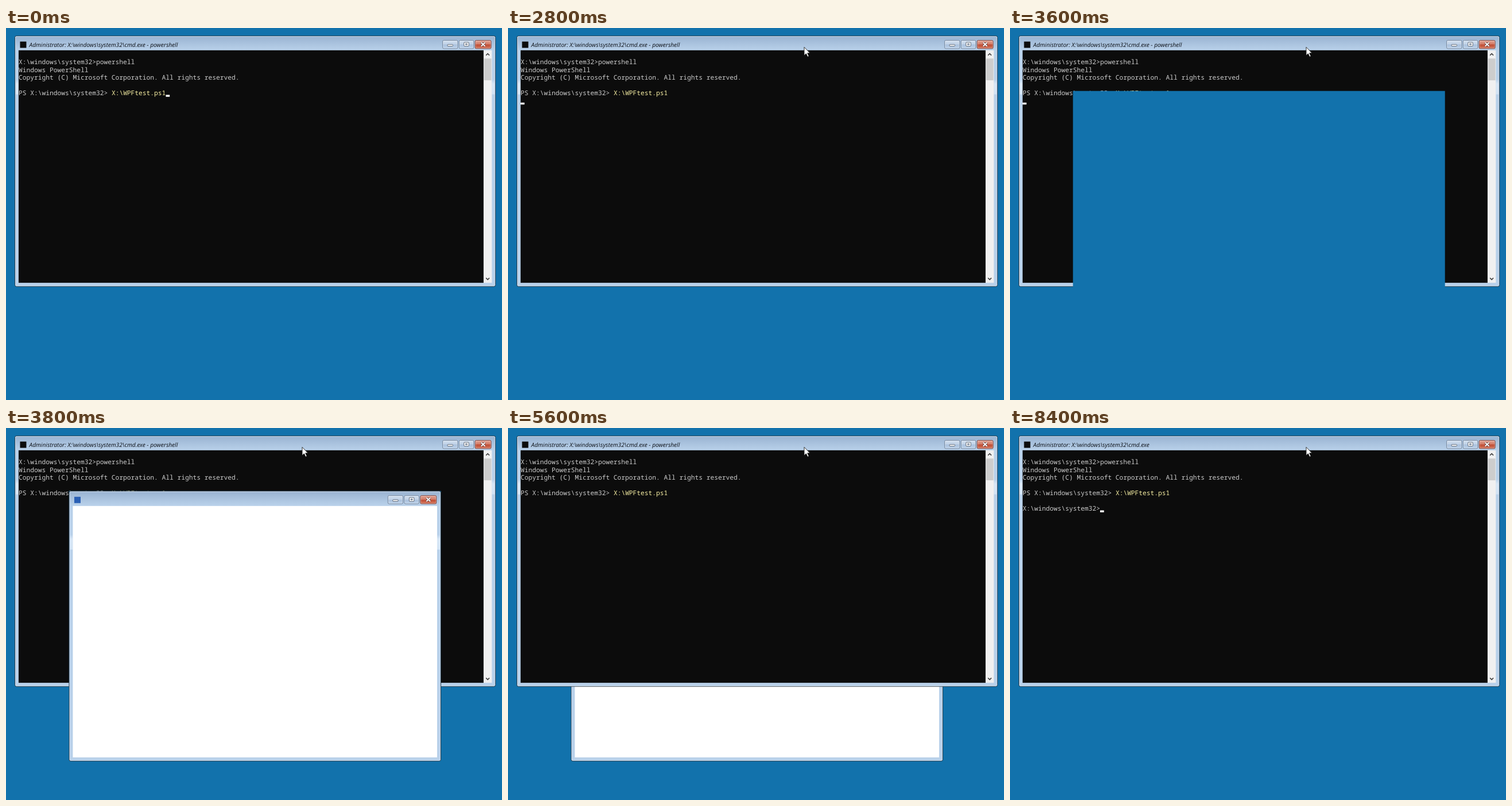
An HTML page that plays this animation: 864x648 px, repeating every 8600 ms.

```html
<!DOCTYPE html>
<html lang="en">
<head>
<meta charset="utf-8">
<title>Console session</title>
<style>
  html, body { margin: 0; width: 100%; height: 100%; overflow: hidden; background: #1272ac; }
  svg { display: block; width: 864px; height: 648px; }
  text { white-space: pre; text-rendering: geometricPrecision; }
  .mono { font: 13.333px "Noto Sans Mono", "DejaVu Sans Mono", monospace; fill: #ccc; }
  .mono .cmd { fill: #f9f1a5; }
  .title { font: italic 12.05px "Open Sans", "Noto Sans", sans-serif; fill: #0a0e14; }
</style>
</head>
<body>
<!-- The desktop is 1024 x 768, shown at 864 x 648. -->
<svg id="stage" viewBox="0 0 1024 768" xmlns="http://www.w3.org/2000/svg">
  <defs>
    <linearGradient id="bar" x2="0" y2="1">
      <stop offset="0" stop-color="#9ab4d2"/><stop offset="1" stop-color="#b9d1ea"/>
    </linearGradient>
    <linearGradient id="glow" x2="0" y2="1">
      <stop offset="0" stop-color="#d8e7f6" stop-opacity="0"/>
      <stop offset=".3" stop-color="#d8e7f6"/><stop offset="1" stop-color="#d3e4f5"/>
    </linearGradient>
    <linearGradient id="btn" x2="0" y2="1">
      <stop offset="0" stop-color="#d3e0ef"/><stop offset=".48" stop-color="#c0d2e7"/>
      <stop offset=".5" stop-color="#a9c0dc"/><stop offset="1" stop-color="#bdd2ea"/>
    </linearGradient>
    <linearGradient id="red" x2="0" y2="1">
      <stop offset="0" stop-color="#e3a596"/><stop offset=".48" stop-color="#d27a66"/>
      <stop offset=".5" stop-color="#bd4a32"/><stop offset="1" stop-color="#d5765c"/>
    </linearGradient>
  </defs>
  <rect width="1024" height="768" fill="#1272ac"/>
  <g id="windows"></g>
  <path id="mouse" d="M611.5 39.5v17l4-3.6l3 6.6l2.7-1.2l-3-6.4h5.3z"
        fill="#fff" stroke="#111"/>
</svg>
<script>
const LOOP = 8600, TICK = 200;
const CELL_W = 8, CELL_H = 16, LEFT = 26, TOP = 46;
const $ = id => document.getElementById(id);

const rect = (x, y, w, h, fill, more = '') =>
  `<rect x="${x}" y="${y}" width="${w}" height="${h}" fill="${fill}" ${more}/>`;
const path = (d, stroke, width) =>
  `<path d="${d}" fill="none" stroke="${stroke}" stroke-width="${width}"/>`;

function button(x, y, w, fill, edge) {
  return rect(x + .5, y + .5, w - 1, 17, fill, `rx="2.5" stroke="${edge}"`) +
    rect(x + 1.5, y + 1.5, w - 3, 15, 'none', 'rx="1.5" stroke="#fff" stroke-opacity=".4"');
}

function buttons(right, y) {
  const x = right - 110, cross = `M${x + 80} ${y + 5}l8 7.5m0-7.5l-8 7.5`;
  const glyph = 'rx="1" stroke="#4a5462"';
  return button(x, y, 32, 'url(#btn)', '#60728a') +
    rect(x + 10.5, y + 9, 11, 3.5, '#fff', glyph) +
    button(x + 34, y, 31, 'url(#btn)', '#60728a') +
    rect(x + 44.5, y + 4.5, 10, 8, '#fff', glyph) +
    rect(x + 47.5, y + 7.5, 4, 2, '#a9c0dc', glyph) +
    button(x + 67, y, 34, 'url(#red)', '#6b2419') +
    path(cross, '#5a3535', 4.2) + path(cross, '#fff', 2.4);
}

function frame(x, y, w, h, icon) {
  const r = x + w;
  return rect(x + .5, y + .5, w - 1, h - 1, '#b9d1ea', 'rx="3" stroke="#15191e"') +
    rect(x + 2, y + 2, w - 4, 28, 'url(#bar)') +
    rect(x + 1.5, y + 1.5, w - 3, h - 3, 'none', 'rx="2" stroke="#dfebf7" stroke-opacity=".75"') +
    rect(x + 2, y + 90, 6, 31, 'url(#glow)') +
    rect(r - 8, y + 90, 6, 31, 'url(#glow)') +
    rect(x + 11, y + 12, 13, 13, icon) + buttons(r, y + 9);
}

const rowTop = row => TOP + CELL_H * row;
const line = (row, text, more = '') =>
  `<text class="mono" x="${LEFT}" y="${rowTop(row) + 13}" ${more}>${text}</text>`;
const PROMPT = 'X:\\windows\\system32&gt;';

function consoleWindow() {
  return frame(18, 16, 993, 518, '#0c0c0c') +
    '<text class="title" x="48" y="39" id="title"></text>' +
    rect(LEFT, TOP, 960, 480, '#0c0c0c') +
    rect(986, TOP, 17, 480, '#f0f0f0') + rect(987, 63, 15, 45, '#cdcdcd') +
    path('M991 56.5l3.5-3.5l3.5 3.5M991 516l3.5 3.5l3.5-3.5', '#444', 2) +
    line(1, PROMPT + 'powershell') +
    line(2, 'Windows PowerShell') +
    line(3, 'Copyright (C) Microsoft Corporation. All rights reserved.') +
    line(5, `PS ${PROMPT} <tspan class="cmd">X:\\WPFtest.ps1</tspan>`) +
    line(7, PROMPT, 'id="prompt"') +
    rect(0, 0, CELL_W, 4, '#fff', 'id="caret"');
}

$('windows').innerHTML =
  `<g id="console">${consoleWindow()}</g>
   <g id="app">${rect(130, 130, 768, 558, '#1272ac')}
     <g id="appFrame">${frame(130, 130, 768, 558, '#2a5fb4') + rect(138, 161, 752, 519, '#fff')}</g>
   </g>`;

// Each step: start time, then the value held until the next one.
const caretOn = [[0, 1], [400, 0], [1000, 1], [1600, 0], [2200, 1], [3800, 0], [4400, 1],
  [5000, 0], [6000, 1], [6600, 0], [7200, 1], [7800, 0], [8400, 1]];
const caretCell = [[0, [38, 5]], [2200, [0, 6]], [6000, [20, 7]]];
const appState = [[0, 'none'], [3400, 'blank'], [3800, 'front'], [5000, 'back'], [5800, 'none']];
const MOUSE_IN = 600, EXIT = 6000;
const at = (steps, t) => steps.findLast(s => s[0] <= t)[1];
const show = (id, on) => $(id).setAttribute('visibility', on ? 'inherit' : 'hidden');

let order = '';
function draw(now) {
  const t = Math.floor((now % LOOP) / TICK) * TICK;
  const app = at(appState, t), ended = t >= EXIT;

  show('app', app !== 'none');
  show('appFrame', app !== 'blank');
  const top = app === 'back' ? 'console' : 'app';
  if (top !== order) $('windows').append($(order = top));

  const [col, row] = at(caretCell, t);
  $('caret').setAttribute('x', LEFT + col * CELL_W);
  $('caret').setAttribute('y', rowTop(row + 1) - 4);
  show('caret', at(caretOn, t));
  show('prompt', ended);
  $('title').textContent =
    'Administrator: X:\\windows\\system32\\cmd.exe' + (ended ? '' : ' - powershell');
  show('mouse', t >= MOUSE_IN);
}

const start = performance.now();
function tick() {
  draw(performance.now() - start);
  requestAnimationFrame(tick);
}
tick();
</script>
</body>
</html>
```
